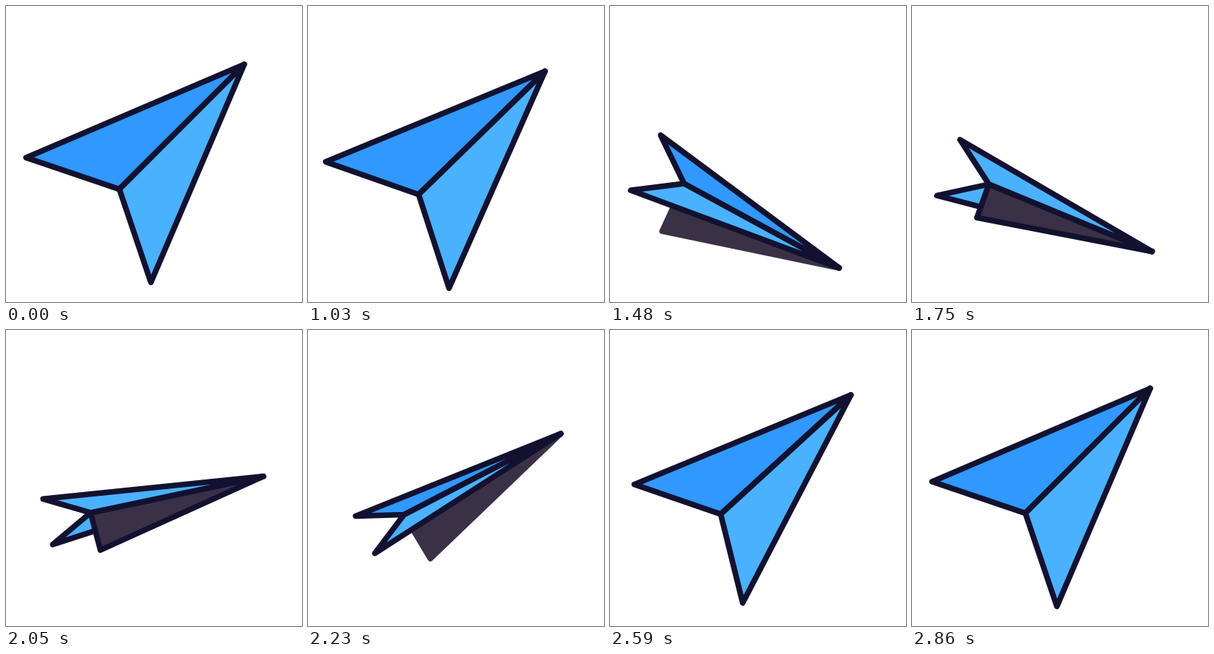
These frames come from a looping animation (400 px wide and 400 px high, 2890 ms). An HTML page with a canvas:

```html
<!DOCTYPE html>
<html lang="en">
<head>
<meta charset="utf-8">
<title>Paper plane</title>
<style>
html, body { margin: 0; width: 100%; height: 100%; overflow: hidden; background: #fff; }
canvas { display: block; width: 400px; height: 400px; }
</style>
</head>
<body>
<canvas id="stage"></canvas>
<script>
const LOOP = 2890, START = 1030, STEP = 30;
const INK = '#121230', DEEP = '#3098fe', LIGHT = '#4ab1ff', KEEL = '#3b3147';

// Key poses of the flight: time, heading, roll (degrees), centre x, centre y
const poses = [
  [1030, -44.3, 1, 213.2, 192.6],
  [1270, 16.8, 19.2, 185.1, 255.4],
  [1540, 28.5, 82, 178.5, 285],
  [1750, 22.4, 110, 186.2, 274.8],
  [2050, -11.9, 105.3, 201.4, 228.6],
  [2380, -36.5, 49.2, 213.2, 197],
  [2620, -43, 21.5, 215.4, 188],
  [2860, -45, 0, 216.1, 184.6]
];
const rest = poses[poses.length - 1];

const canvas = document.getElementById('stage');
const ctx = canvas.getContext('2d');
const ratio = window.devicePixelRatio || 1;
canvas.width = canvas.height = 400 * ratio;

// Rate of change of one pose value at a key
function rate(i, part) {
  const a = poses[i - 1], p = poses[i], b = poses[i + 1];
  if (!b) return 0;
  const k = b[0] - p[0], after = (b[part] - p[part]) / k;
  if (!a) return after;
  const h = p[0] - a[0], before = (p[part] - a[part]) / h;
  return (before * k + after * h) / (h + k);
}

// Smooth curve through the key poses
function poseAt(t) {
  if (t < START) return rest;
  let i = 0;
  while (i < poses.length - 2 && t >= poses[i + 1][0]) i++;
  const from = poses[i], to = poses[i + 1];
  const d = to[0] - from[0];
  const s = Math.min(1, (t - from[0]) / d), r = 1 - s;
  return from.map((v, part) =>
    v * (1 + 2 * s) * r * r + rate(i, part) * d * s * r * r +
    to[part] * s * s * (3 - 2 * s) - rate(i + 1, part) * d * s * s * r);
}

function panel(points, fill, ink = INK) {
  ctx.beginPath();
  for (const [x, y] of points) ctx.lineTo(x, y);
  ctx.closePath();
  ctx.fillStyle = fill;
  ctx.strokeStyle = ink;
  ctx.fill();
  ctx.stroke();
}

function draw([, heading, roll, cx, cy]) {
  const turn = heading * Math.PI / 180, bank = roll * Math.PI / 180;
  const c = Math.cos(turn), s = Math.sin(turn);
  const flat = Math.cos(bank), tilt = Math.sin(bank);
  const above = flat > 0;

  // along the crease, across the wings
  const place = (u, v) => [cx + u * c - v * s, cy + u * s + v * c];
  const nose = place(149.5, 0), tail = place(-89, 0);
  const left = place(-148, -119.3 * flat), right = place(-148, 119.3 * flat);
  const keel = place(-85.5 + 3.5 * flat, 33 * flat + 63 * tilt);

  ctx.setTransform(ratio, 0, 0, ratio, 0, 0);
  ctx.fillStyle = '#fff';
  ctx.fillRect(0, 0, 400, 400);
  ctx.lineWidth = 7.6;
  ctx.lineJoin = 'round';

  if (above) panel([nose, tail, keel], KEEL, KEEL);
  panel([nose, left, tail], above ? DEEP : LIGHT);
  if (!above) panel([nose, tail, keel], KEEL);
  panel([nose, right, tail], LIGHT);
}

function tick(now) {
  const t = now % LOOP;
  draw(poseAt(START + Math.floor((t - START) / STEP) * STEP));
  requestAnimationFrame(tick);
}

draw(rest);
requestAnimationFrame(tick);
</script>
</body>
</html>
```
